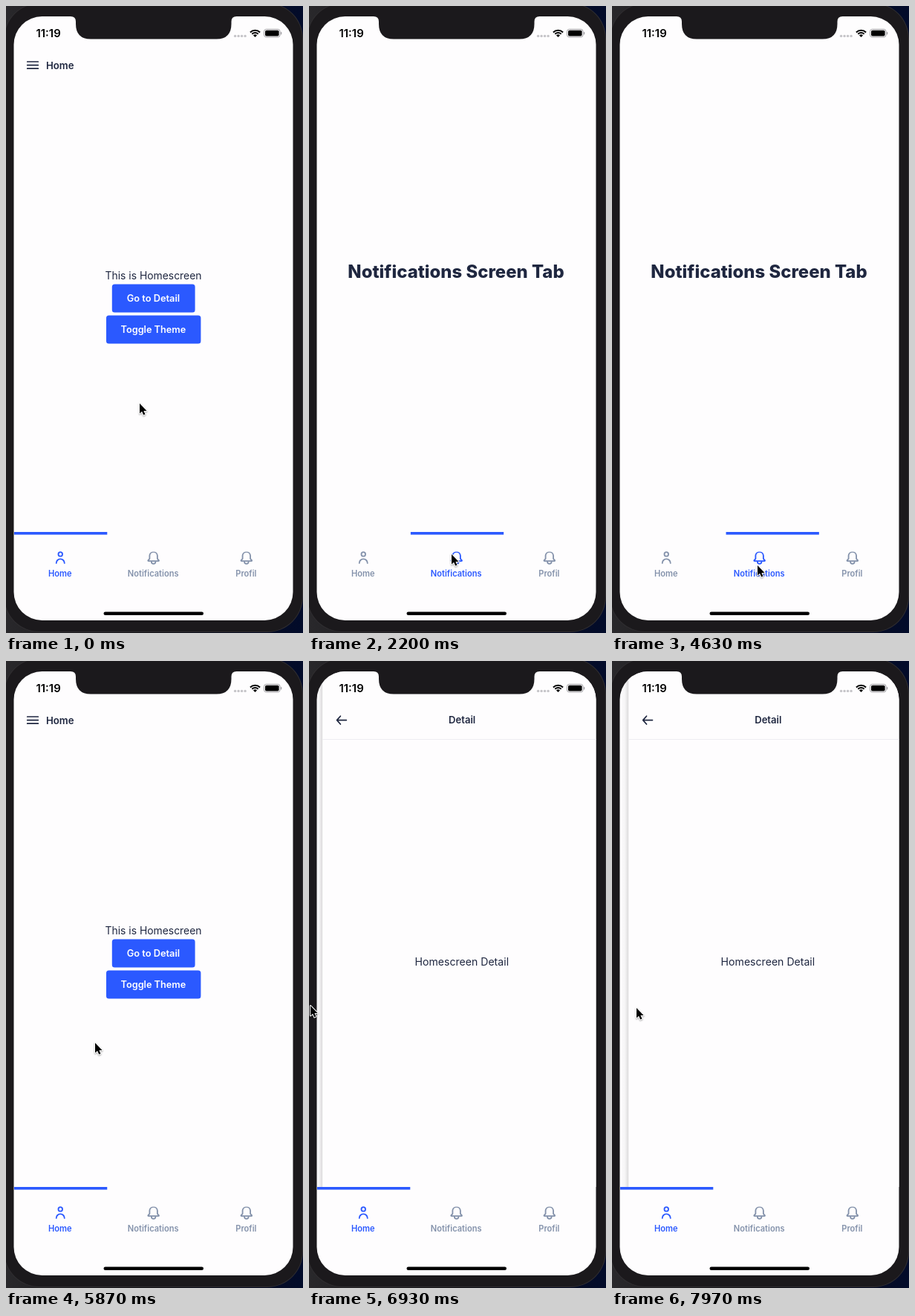
An HTML page with a canvas that plays this animation: 400 by 844 pixels, repeating every 8 s.

```html
<!DOCTYPE html>
<html lang="en">
<head>
<meta charset="utf-8">
<title>Tab navigation</title>
<style>
html, body { margin: 0; width: 100%; height: 100%; overflow: hidden; background: #1a181b; }
canvas { display: block; width: 400px; height: 844px; }
</style>
</head>
<body>
<canvas id="stage"></canvas>
<script>
const W = 400, H = 844, LOOP = 8000;
const BLUE = '#2b59ff', INK = '#1f2740', GRAY = '#8492ab', PAPER = '#fefdfe', BEZEL = '#1b191c';
const SCREEN = { x: 10.5, y: 14, w: 376, h: 813, r: 38 };
const BAR_Y = 708, TAB_W = 125.3, LEFT = 11;
const FONT = 'Inter, "Open Sans", sans-serif';

const canvas = document.getElementById('stage');
const ctx = canvas.getContext('2d');
const dpr = window.devicePixelRatio || 1;
canvas.width = W * dpr;
canvas.height = H * dpr;

// Icons on a 24 unit grid
const PERSON = new Path2D('M12 11a4 4 0 1 0-4-4 4 4 0 0 0 4 4zm0-6a2 2 0 1 1-2 2 2 2 0 0 1 2-2zm0 8a7 7 0 0 0-7 7 1 1 0 0 0 2 0 5 5 0 0 1 10 0 1 1 0 0 0 2 0 7 7 0 0 0-7-7z');
const BELL = new Path2D('M20.5 15.2l-1.8-1.8V8.9a6.8 6.8 0 0 0-13.4-.2v4.7l-1.8 1.8A1.64 1.64 0 0 0 4.6 18H8v.3a4 3.7 0 0 0 8 0V18h3.4a1.64 1.64 0 0 0 1.1-2.8zM14 18.3a2 1.7 0 0 1-4 0V18h4zM5.5 16l1.2-1.2a2 2 0 0 0 .6-1.4V8.7a4.72 4.72 0 0 1 9.4.2v4.5a2 2 0 0 0 .6 1.4L18.5 16z');
const ARROW = new Path2D('M0 0V13.6L3.1 10.8 5.2 15.6 7.5 14.6 5.4 9.9H9.6Z');

const TABS = [
  { label: 'Home', icon: PERSON, x: 72.8 },
  { label: 'Notifications', icon: BELL, x: 198.2 },
  { label: 'Profil', icon: BELL, x: 323.4 }
];

const TAPS = [
  { t: -2000, tab: 0 },
  { t: 1730, tab: 1 },
  { t: 3135, tab: 2 },
  { t: 4464, tab: 1 },
  { t: 5350, tab: 0 }
];
const PUSH_AT = 6610, DRAG_AT = 7530, DRAG_SLACK = 21.5;

// Pointer stops: time, x, y
const STOPS = [
  [0, 180, 535], [900, 180, 535], [1600, 192, 738], [2500, 192, 738],
  [3000, 318, 743], [3700, 318, 743], [4180, 235, 761], [4440, 196, 753],
  [4680, 196, 753], [5040, 182, 757], [5290, 72, 745], [5420, 72, 745],
  [5870, 120, 514], [6350, 195, 395], [6590, 195, 395], [6930, 2, 464],
  [7150, 1, 467], [7530, 13, 468], [7970, 33, 467], [8000, 33, 467]
];

function pointer(t) {
  const i = Math.max(1, STOPS.findIndex(s => s[0] >= t));
  const [t0, x0, y0] = STOPS[i - 1], [t1, x1, y1] = STOPS[i];
  const u = (t - t0) / (t1 - t0), k = u * u * (3 - 2 * u);
  return { x: x0 + (x1 - x0) * k, y: y0 + (y1 - y0) * k };
}

// Underdamped spring, 0 to 1
function tabSpring(ms) {
  const s = ms / 1000, w = 15.17, decay = 11, wd = Math.sqrt(w * w - decay * decay);
  return 1 - Math.exp(-decay * s) * (Math.cos(wd * s) + decay / wd * Math.sin(wd * s));
}

// Critically damped spring: share of the way still to go
function pushRest(ms) {
  const a = Math.sqrt(1000 / 3) * ms / 1000;
  return (1 + a) * Math.exp(-a);
}

function tabState(t) {
  let i = TAPS.length - 1;
  while (i > 0 && TAPS[i].t > t) i--;
  const tab = TAPS[i].tab, from = i ? TAPS[i - 1].tab : tab;
  return { tab, bar: from + (tab - from) * tabSpring(t - TAPS[i].t) };
}

function text(str, x, y, size, weight, color, align = 'center') {
  ctx.font = `${weight} ${size}px ${FONT}`;
  ctx.textAlign = align;
  ctx.fillStyle = color;
  ctx.fillText(str, x, y);
}

function box(x, y, w, h, r, color) {
  ctx.fillStyle = color;
  ctx.beginPath();
  ctx.roundRect(x, y, w, h, r);
  ctx.fill();
}

function stroke(path, width, color) {
  ctx.lineWidth = width;
  ctx.strokeStyle = color;
  ctx.stroke(new Path2D(path));
}

function phone() {
  const bg = ctx.createLinearGradient(0, 0, W, 0);
  bg.addColorStop(0, '#29282b');
  bg.addColorStop(0.5, '#111115');
  bg.addColorStop(1, '#020b2a');
  ctx.fillStyle = bg;
  ctx.fillRect(0, 0, W, H);
  box(-3, -4, 403, 847, 48, '#302e31');
  box(-2, -3, 401, 845, 47, BEZEL);
  box(SCREEN.x, SCREEN.y, SCREEN.w, SCREEN.h, SCREEN.r, PAPER);
}

function homeCard() {
  ctx.lineCap = 'round';
  stroke('M28.7 75H43.3M28.7 79.6H43.3M28.7 84.2H43.3', 1.7, INK);
  text('Home', 54, 84.5, 13.2, 600, INK, 'left');
  text('This is Homescreen', 198.5, 368.3, 13.9, 400, INK);
  box(142.8, 374.6, 111.8, 38, 3.5, BLUE);
  box(135, 416.6, 127.4, 37.8, 3.5, BLUE);
  text('Go to Detail', 198.4, 398.3, 12.8, 600, '#fff');
  text('Toggle Theme', 198.4, 440.2, 12.7, 600, '#fff');
}

function detailCard() {
  const shade = ctx.createLinearGradient(LEFT - 11, 0, LEFT, 0);
  shade.addColorStop(0, 'rgba(0,0,0,0)');
  shade.addColorStop(0.55, 'rgba(0,0,0,0.035)');
  shade.addColorStop(1, 'rgba(0,0,0,0.14)');
  ctx.fillStyle = shade;
  ctx.fillRect(LEFT - 11, 14, 11, BAR_Y - 14);
  ctx.fillStyle = PAPER;
  ctx.fillRect(LEFT, 14, 380, BAR_Y - 14);
  ctx.fillStyle = '#eeedf2';
  ctx.fillRect(LEFT, 105, 380, 1);
  ctx.lineCap = ctx.lineJoin = 'round';
  stroke('M43 79.6H30.2M35 74.2L30.2 79.6 35 85', 1.7, INK);
  text('Detail', 198.8, 84.2, 13.1, 600, INK);
  text('Homescreen Detail', 198.4, 410.3, 14.1, 400, INK);
}

function shifted(dx, draw) {
  ctx.save();
  ctx.translate(dx, 0);
  draw();
  ctx.restore();
}

function content(t, tab) {
  ctx.save();
  ctx.beginPath();
  ctx.rect(0, 0, W, BAR_Y);
  ctx.clip();
  if (tab === 1) text('Notifications Screen Tab', 198, 366.3, 23.9, 800, INK);
  else if (tab === 2) text('Profil Screen Tab', 198, 369.8, 32.5, 800, INK);
  else if (t < PUSH_AT) homeCard();
  else {
    const drag = t > DRAG_AT ? Math.max(0, pointer(t).x - DRAG_SLACK) : 0;
    const offset = SCREEN.w * pushRest(t - PUSH_AT) + drag;
    shifted(-0.3 * (SCREEN.w - offset), homeCard);
    shifted(offset, detailCard);
  }
  ctx.restore();
}

function tabBar(tab, bar) {
  ctx.fillStyle = BLUE;
  ctx.fillRect(LEFT + bar * TAB_W, BAR_Y, TAB_W, 3.6);
  TABS.forEach(({ label, icon, x }, i) => {
    const color = i === tab ? BLUE : GRAY;
    ctx.save();
    ctx.translate(x - 10.6, 731.5);
    ctx.scale(0.92, 0.92);
    ctx.fillStyle = color;
    ctx.fill(icon);
    ctx.restore();
    text(label, x, 767.8, 11.1, 600, color);
  });
}

function chrome() {
  ctx.fillStyle = BEZEL;
  ctx.fill(new Path2D('M87 13V14Q94 14 94 21V24Q94 44.5 114 44.5H283.5Q303.5 44.5 303.5 24V21Q303.5 14 310.5 14V13Z'));
  text('11:19', 40.5, 42.2, 14.9, 600, '#000', 'left');
  ctx.fillStyle = '#c5c4c8';
  for (let i = 0; i < 4; i++) {
    ctx.beginPath();
    ctx.arc(308.6 + i * 4.5, 40.4, 1.7, 0, 7);
    ctx.fill();
  }
  ctx.lineCap = 'butt';
  ctx.strokeStyle = ctx.fillStyle = '#000';
  ctx.lineWidth = 2;
  for (const r of [5.9, 9.3]) {
    ctx.beginPath();
    ctx.arc(335.5, 42, r, -Math.PI * 0.75, -Math.PI * 0.25);
    ctx.stroke();
  }
  ctx.beginPath();
  ctx.moveTo(335.5, 42);
  ctx.arc(335.5, 42, 3.5, -Math.PI * 0.75, -Math.PI * 0.25);
  ctx.fill();
  ctx.strokeStyle = '#a3a2a6';
  ctx.lineWidth = 1;
  ctx.beginPath();
  ctx.roundRect(347.5, 31.3, 21.6, 10.6, 3);
  ctx.stroke();
  box(349, 32.8, 18.6, 7.6, 1.7, '#000');
  box(370, 34.8, 1.3, 3.6, 0.6, '#a3a2a6');
  box(131.5, 815.4, 134.5, 4.6, 2.3, '#000');
}

function cursor({ x, y }) {
  ctx.save();
  ctx.translate(x, y);
  ctx.lineJoin = 'round';
  ctx.shadowColor = 'rgba(0,0,0,0.35)';
  ctx.shadowBlur = 2 * dpr;
  ctx.shadowOffsetY = dpr;
  ctx.strokeStyle = '#fff';
  ctx.lineWidth = 2;
  ctx.stroke(ARROW);
  ctx.shadowColor = 'transparent';
  ctx.fillStyle = '#000';
  ctx.fill(ARROW);
  ctx.restore();
}

function frame() {
  const t = performance.now() % LOOP;
  const { tab, bar } = tabState(t);
  ctx.setTransform(dpr, 0, 0, dpr, 0, 0);
  phone();
  ctx.save();
  ctx.beginPath();
  ctx.roundRect(SCREEN.x, SCREEN.y, SCREEN.w, SCREEN.h, SCREEN.r);
  ctx.clip();
  content(t, tab);
  tabBar(tab, bar);
  ctx.restore();
  chrome();
  cursor(pointer(t));
  requestAnimationFrame(frame);
}
frame();
</script>
</body>
</html>
```
